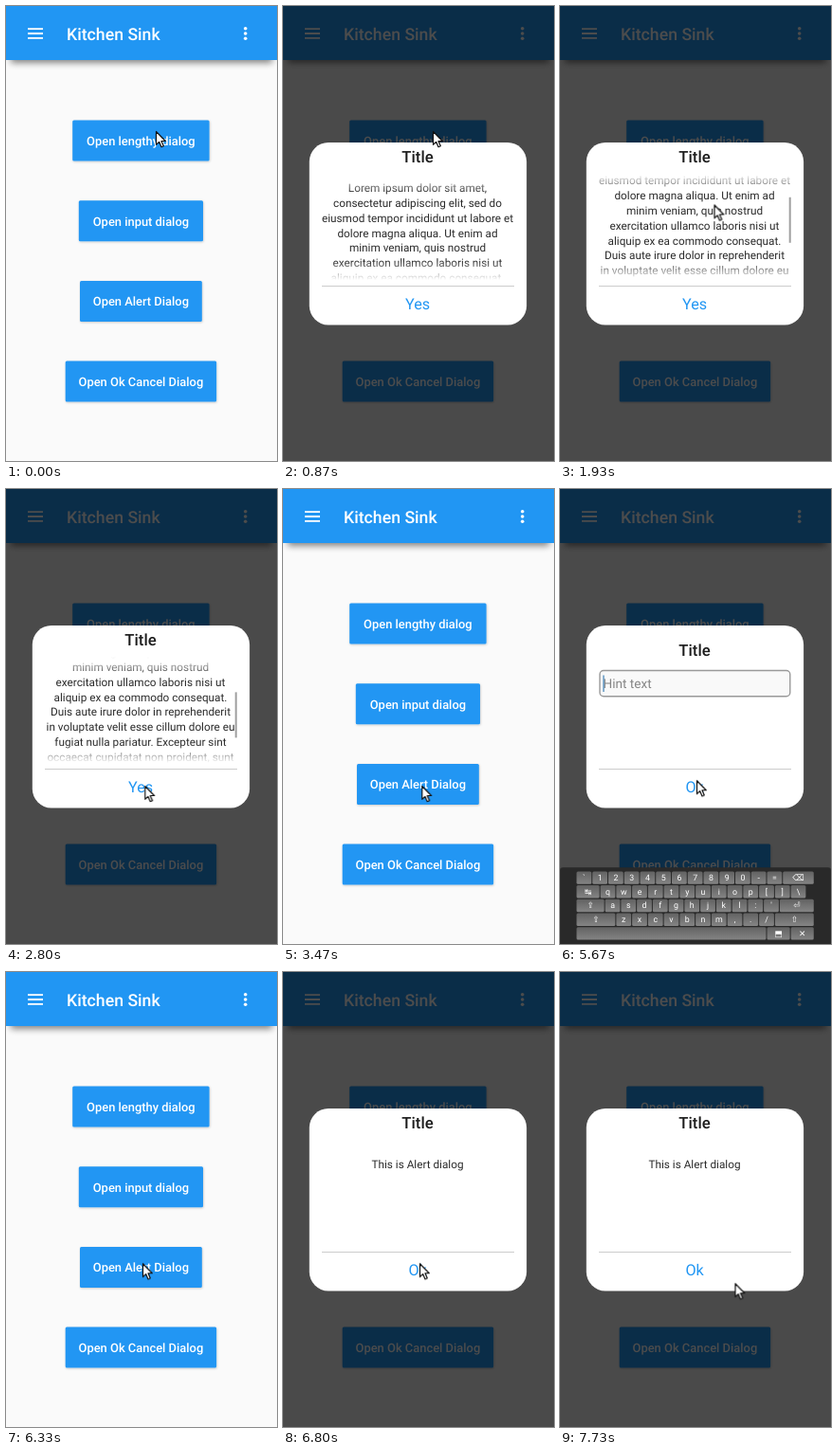
These frames come from a looping animation (286x480 px, 8 s). An HTML page:

```html
<!DOCTYPE html>
<html lang="en">
<head>
<meta charset="utf-8">
<title>Dialogs</title>
<style>
  html, body { margin: 0; width: 100%; height: 100%; overflow: hidden; background: #fafafa; }
  svg { display: block; width: 100%; height: 100%; }
  text { font-family: Roboto, "DejaVu Sans", sans-serif; text-rendering: geometricPrecision; }
  .mid { text-anchor: middle; }
  .label { font-size: 12.9px; font-weight: 500; fill: #fff; }
  .title { font-size: 16.8px; font-weight: 500; fill: #1c1c1c; }
  .action { font-size: 16.2px; fill: #2196f3; }
  .body { font-size: 11.78px; fill: #2a2a2a; }
  .key { font-size: 8.8px; fill: #fff; }
</style>
</head>
<body>
<svg viewBox="0 0 286 480">
  <defs>
    <filter id="soft" x="-20%" y="-80%" width="140%" height="260%"><feGaussianBlur stdDeviation="3.5"/></filter>
    <filter id="lift" x="-10%" y="-20%" width="120%" height="150%">
      <feDropShadow dx="0.5" dy="0.8" stdDeviation="1.3" flood-opacity=".22"/>
    </filter>
    <linearGradient id="fade" x2="0" y2="1">
      <stop offset="0" stop-color="#fff" stop-opacity="0"/>
      <stop offset=".18" stop-color="#fff"/>
      <stop offset=".82" stop-color="#fff"/>
      <stop offset="1" stop-color="#fff" stop-opacity="0"/>
    </linearGradient>
    <linearGradient id="keyFill" x2="0" y2="1">
      <stop offset="0" stop-color="#626262"/>
      <stop offset="1" stop-color="#848484"/>
    </linearGradient>
    <mask id="view" maskUnits="userSpaceOnUse" x="28" y="177" width="229" height="112">
      <rect x="28" y="177" width="229" height="112" fill="url(#fade)"/>
    </mask>
  </defs>

  <rect width="286" height="480" fill="#fafafa"/>
  <rect x="5" y="40" width="276" height="20" opacity=".48" filter="url(#soft)"/>
  <rect width="286" height="57" fill="#2196f3"/>
  <path d="M23 24.1h16M23 29h16M23 33.9h16" stroke="#fff" stroke-width="1.8"/>
  <g fill="#fff">
    <circle cx="252.7" cy="23.7" r="1.8"/><circle cx="252.7" cy="29" r="1.8"/><circle cx="252.7" cy="34.3" r="1.8"/>
  </g>
  <text x="64" y="36" font-size="17.7" font-weight="500" fill="#fff">Kitchen Sink</text>
  <g id="buttons"></g>

  <rect id="shade" width="286" height="480" opacity="0"/>
  <g id="lengthy" opacity="0">
    <g mask="url(#view)"><g id="lorem"></g></g>
    <rect id="bar" x="241.7" y="184" width="2" height="48" fill="#a0a0a0"/>
  </g>
  <g id="input" opacity="0">
    <rect x="42" y="191.5" width="200.8" height="27.2" rx="4" fill="#f9f9f9" stroke="#999" stroke-width="1.4"/>
    <text x="45.5" y="209.8" font-size="13.6" fill="#858585">Hint text</text>
    <rect id="caret" x="45.4" y="196.5" width="1.2" height="17.5" fill="#3b7fb5"/>
  </g>
  <g id="alert" opacity="0">
    <text class="body mid" x="142" y="207.3">This is Alert dialog</text>
  </g>
  <g id="keyboard"><rect y="399.2" width="286" height="84" rx="3" fill="#292929"/></g>
  <path id="pointer" d="M.5 .5V14.3L3.7 11.4 6 16.7 8.3 15.7 6 10.5H10.3Z" fill="#fff" stroke="#111" stroke-width="1.2" stroke-linejoin="round"/>
</svg>

<script>
const LOOP = 8000;
const start = performance.now();
const $ = id => document.getElementById(id);

function add(parent, tag, attrs, text = "") {
  const el = document.createElementNS("http://www.w3.org/2000/svg", tag);
  for (const name in attrs) el.setAttribute(name, attrs[name]);
  el.textContent = text;
  parent.append(el);
  return el;
}

// Buttons: label, width, top
[["Open lengthy dialog", 144.4, 120.6], ["Open input dialog", 131.2, 205.2],
 ["Open Alert Dialog", 128.8, 289.9], ["Open Ok Cancel Dialog", 159.4, 374.5]].forEach(([label, width, y]) => {
  add($("buttons"), "rect", { x: 142.4 - width / 2, y, width, height: 43, rx: 1.5, fill: "#2196f3", filter: "url(#lift)" });
  add($("buttons"), "text", { class: "label mid", x: 142.4, y: y + 26.5 }, label);
});

// Shared dialog frame, placed behind each dialog's own content
function frame(id, titleY, action) {
  const g = document.createElementNS("http://www.w3.org/2000/svg", "g");
  add(g, "rect", { x: 27.8, y: 144.1, width: 229.3, height: 192.3, rx: 20, fill: "#fff" });
  add(g, "rect", { x: 41, y: 295, width: 203, height: 1, fill: "#ccc" });
  add(g, "text", { class: "title mid", x: 142, y: titleY }, "Title");
  add(g, "text", { class: "action mid", x: 142.1, y: 320.1 }, action);
  $(id).prepend(g);
}
frame("lengthy", 165.3, "Yes");
frame("input", 176.2, "Ok");
frame("alert", 165.3, "Ok");

["Lorem ipsum dolor sit amet,", "consectetur adipiscing elit, sed do",
 "eiusmod tempor incididunt ut labore et", "dolore magna aliqua. Ut enim ad",
 "minim veniam, quis nostrud", "exercitation ullamco laboris nisi ut",
 "aliquip ex ea commodo consequat.", "Duis aute irure dolor in reprehenderit",
 "in voluptate velit esse cillum dolore eu", "fugiat nulla pariatur. Excepteur sint",
 "occaecat cupidatat non proident, sunt", "in culpa qui officia deserunt mollit",
 "anim id est laborum."].forEach((line, i) =>
  add($("lorem"), "text", { class: "body mid", x: 142, y: 196 + i * 15.85 }, line));

// Keyboard rows: first key and size, one-unit keys, then more keys with sizes
const UNIT = 16.75;
[["", 0, "`1234567890-=", "⌫", 2], ["↹", 1.5, "qwertyuiop[]\\"],
 ["⇪", 1.8, "asdfghjkl:'", "⏎", 2.2], ["⇧", 2.5, "zxcvbnm,./", "⇧", 2.5],
 [" ", 12, "", "⬒", 1.5, "✕", 1.5]].forEach(([first, firstSize, plain, ...rest], row) => {
  const keys = firstSize ? [[first, firstSize]] : [];
  for (const c of plain) keys.push([c, 1]);
  for (let i = 0; i < rest.length; i += 2) keys.push([rest[i], rest[i + 1]]);
  let x = 17;
  const y = 403.4 + row * 14.7;
  for (const [label, size] of keys) {
    const width = size * UNIT;
    add($("keyboard"), "rect", { x: x + .5, y, width: width - 1, height: 13.4, rx: 1.5, fill: "url(#keyFill)" });
    add($("keyboard"), "text", { class: "key mid", x: x + width / 2, y: y + 9.5 }, label);
    x += width;
  }
});

// Plays a table of [ms, value] steps; equal times make a hard change
function play(id, prop, steps, format = v => v) {
  const all = [[0, steps[0][1]], ...steps, [LOOP, steps.at(-1)[1]]];
  const anim = $(id).animate(all.map(([ms, v]) => ({ offset: ms / LOOP, [prop]: format(v) })),
    { duration: LOOP, iterations: Infinity });
  anim.startTime = start;
}
const move = ([x, y]) => `translate(${x}px, ${y}px)`;
const shift = y => move([0, y]);
const shown = (...spans) => spans.flatMap(([from, to]) => [[from, 0], [from, 1], [to, 1], [to, 0]]);

play("shade", "opacity", [
  [270, 0], [470, .7], [3270, .7], [3470, 0], [4070, 0], [4270, .7],
  [5930, .7], [6200, 0], [6600, 0], [6800, .7]]);
play("lengthy", "opacity", shown([270, 3470]));
play("input", "opacity", shown([4070, 6200]));
play("alert", "opacity", [[6600, 0], [6600, 1]]);
play("caret", "opacity", shown([4700, 5200], [5670, 5930]));
play("keyboard", "transform", [[4480, 84], [4700, 0], [5930, 0], [6130, 84]], shift);

const scroll = [[1500, 0], [1900, 39.5], [2000, 39.5], [2350, 67.5]];
play("lorem", "transform", scroll, s => shift(-s));
play("bar", "transform", scroll, s => shift(s * .45));
play("bar", "opacity", [[1450, 0], [1550, 1]]);

play("pointer", "transform", [
  [0, [158, 132]], [900, [158, 132]], [1130, [158, 143]], [1480, [162.5, 250]], [1900, [162.5, 209.5]],
  [2000, [162.5, 209.5]], [2350, [162, 182]], [2450, [162, 182]], [2800, [146.3, 313]],
  [3500, [146.3, 313]], [3870, [148.5, 231]], [4250, [148.5, 231]], [4400, [148, 208]],
  [4520, [148, 208]], [4870, [144, 307.3]], [7200, [144, 307.3]], [7730, [184.5, 328.3]]], move);
</script>
</body>
</html>
```
